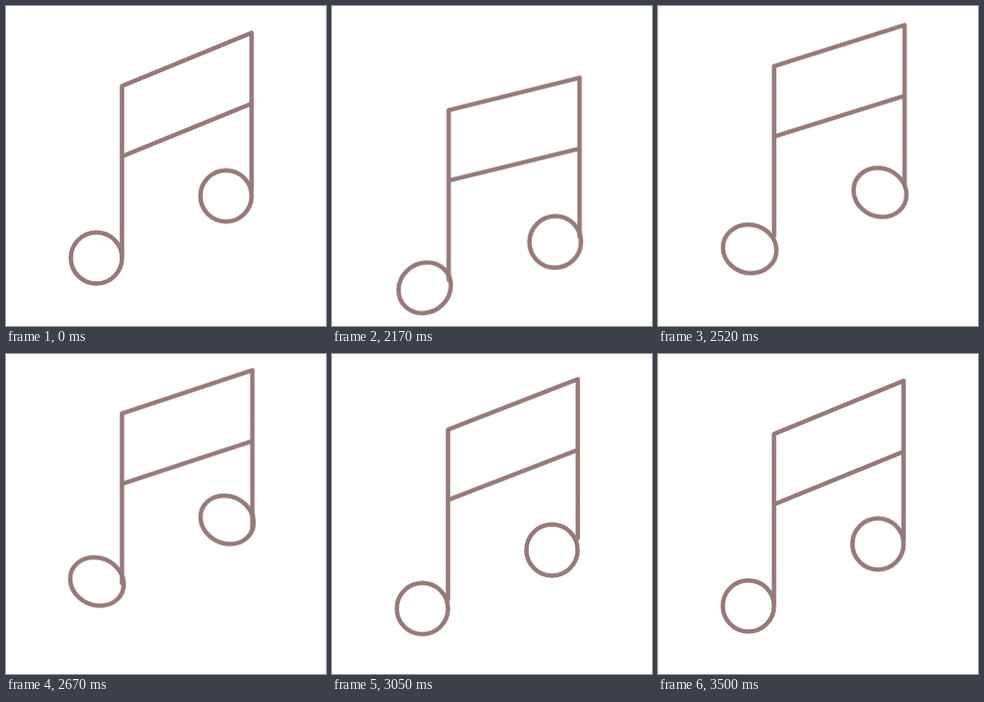
An HTML page that plays this animation: 400x400 px, repeating every 3.52 s.

```html
<!DOCTYPE html>
<html lang="en">
<head>
<meta charset="utf-8">
<title>Bouncing note</title>
<style>
  html, body { margin: 0; width: 100%; height: 100%; overflow: hidden; background: #fff; }
  svg { display: block; width: 100vw; height: 100vh; }
  path, circle {
    fill: none;
    stroke: #957a79;
    stroke-width: 5.5;
    stroke-linecap: round;
    stroke-linejoin: round;
    vector-effect: non-scaling-stroke;
  }
  .beam, .head {
    --start: cubic-bezier(.3, .2, .6, 1);
    --settle: cubic-bezier(.3, .5, .6, 1);
    animation: 3520ms cubic-bezier(.37, 0, .63, 1) infinite;
  }
  .beam { animation-name: beam; }
  .left { animation-name: left; }
  .right { animation-name: right; }

  /* The beam drops, tilts flatter and swings back */
  @keyframes beam {
    0% { transform: translate(0, 0) skewY(0deg) scaleX(1); }
    56.82% { transform: translate(0, 0) skewY(0deg) scaleX(1); animation-timing-function: var(--start); }
    66.48% { transform: translate(1px, 37.6px) skewY(11.2deg) scaleX(1.013); }
    73.3% { transform: translate(0, -35px) skewY(4.3deg) scaleX(1.006); }
    81.25% { transform: translate(0, 4.5px) skewY(4.6deg) scaleX(1.006); }
    89.49% { transform: translate(0, -9px) skewY(0deg) scaleX(1); animation-timing-function: var(--settle); }
    99.15%, 100% { transform: translate(0, 0) skewY(0deg) scaleX(1); }
  }

  /* The heads follow a little later and stretch on the way */
  @keyframes left {
    0% { transform: matrix(1, 0, 0, 1, 0, 0); }
    56.82% { transform: matrix(1, 0, 0, 1, 0, 0); animation-timing-function: var(--start); }
    67.05% { transform: matrix(1.026, -.06, -.06, .99, 3.7, 48); }
    74.15% { transform: matrix(1.05, .062, .062, .938, .8, -34.5); }
    83.24% { transform: matrix(1, 0, 0, 1, 0, 12); }
    90.34% { transform: matrix(1, 0, 0, 1, 0, -6.5); animation-timing-function: var(--settle); }
    99.15%, 100% { transform: matrix(1, 0, 0, 1, 0, 0); }
  }
  @keyframes right {
    0% { transform: matrix(1, 0, 0, 1, 0, 0); }
    56.82% { transform: matrix(1, 0, 0, 1, 0, 0); animation-timing-function: var(--start); }
    67.05% { transform: matrix(1.01, -.005, -.005, 1.01, 5.2, 74); }
    74.15% { transform: matrix(1.04, .062, .062, .938, 1.5, -35); }
    83.24% { transform: matrix(1, 0, 0, 1, 0, 22); }
    90.34% { transform: matrix(1, 0, 0, 1, 0, -8.5); animation-timing-function: var(--settle); }
    99.15%, 100% { transform: matrix(1, 0, 0, 1, 0, 0); }
  }
</style>
</head>
<body>
<svg viewBox="0 0 400 400">
  <g transform="translate(145 100)">
    <path class="beam" d="M0 212V0L162 -66.5V132M0 88L162 22"/>
  </g>
  <g transform="translate(113 315)"><circle class="head left" r="32"/></g>
  <g transform="translate(275 237.5)"><circle class="head right" r="32"/></g>
</svg>
</body>
</html>
```
